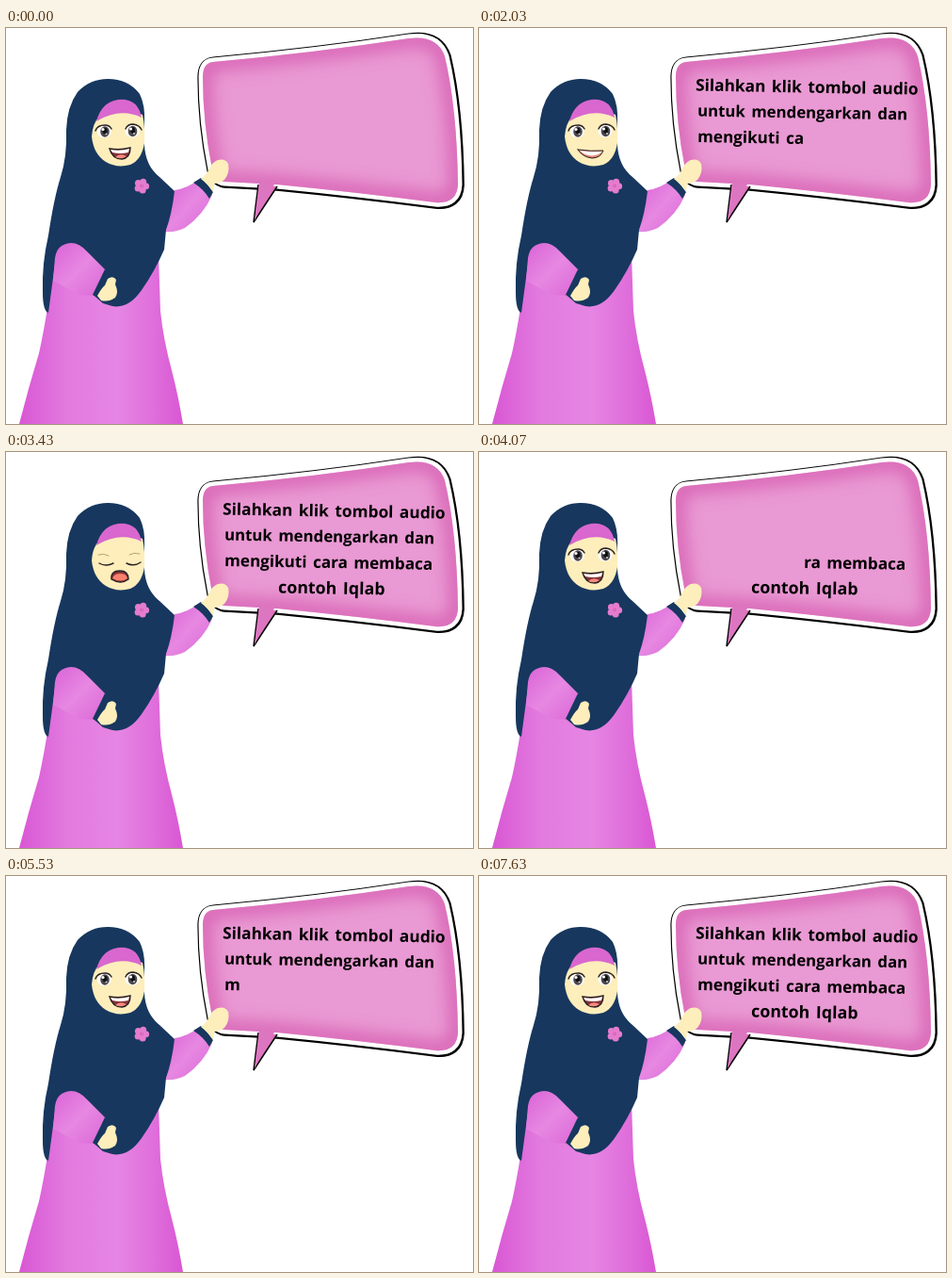
Write an HTML page that moves like this. It is 496 px wide and 420 px high and loops after 7.66 s.

```html
<!DOCTYPE html>
<html lang="id">
<head>
<meta charset="utf-8">
<style>
html, body { margin: 0; width: 100%; height: 100%; overflow: hidden; background: #fff; }
svg { display: block; width: 496px; height: 420px; }
text { font-family: "Open Sans", "Noto Sans", sans-serif; font-weight: bold; word-spacing: 2px; white-space: pre; }
.line { fill: none; stroke: #2a2024; stroke-width: 1.4; stroke-linecap: round; }
.skin { fill: #fdeebb; }
.navy { fill: #17375e; }
</style>
</head>
<body>
<svg viewBox="0 0 496 420">
  <defs>
    <linearGradient id="robe">
      <stop offset="0" stop-color="#d957d4"/><stop offset=".3" stop-color="#e27bdf"/>
      <stop offset=".6" stop-color="#e685e3"/><stop offset=".8" stop-color="#e071dc"/>
      <stop offset="1" stop-color="#d957d4"/>
    </linearGradient>
    <linearGradient id="sleeve" x2="1" y2="1">
      <stop offset="0" stop-color="#da62d6"/><stop offset=".5" stop-color="#e788e2"/>
      <stop offset="1" stop-color="#db67d7"/>
    </linearGradient>
    <filter id="soft" x="-20%" y="-20%" width="140%" height="140%"><feGaussianBlur stdDeviation="9"/></filter>
    <path id="panel" d="M220 36Q330 26 428 11Q458 7 466 30Q479 85 480 166Q479 187 456 185Q370 174 288 166L232 163Q223 162 219 150Q209 100 209 52Q209 37 220 36Z"/>
    <clipPath id="inside"><use href="#panel"/></clipPath>
  </defs>

  <!-- speech bubble -->
  <use href="#panel" x=".6" y=".6" fill="#000" stroke="#000" stroke-width="12.500" stroke-linejoin="round"/>
  <use href="#panel" fill="#fff" stroke="#fff" stroke-width="9" stroke-linejoin="round"/>
  <path d="M268 166L263 206L288 168" fill="#dd72bf" stroke="#000" stroke-width="1.500"/>
  <use href="#panel" fill="#e999d3"/>
  <g clip-path="url(#inside)">
    <use href="#panel" fill="none" stroke="#d862b4" stroke-width="18" filter="url(#soft)"/>
  </g>
  <path d="M269 163L264 204L286 164Z" fill="#dd76c1"/>
  <g id="words"></g>

  <!-- robe, veil and arms -->
  <path d="M52 236Q45 300 35 345Q24 381 14 420H188Q183 390 176 363Q167 330 164 300L162 240Z" fill="url(#robe)"/>
  <path d="M179 172Q193 170 204 161L219 177Q210 198 190 212Q180 217 169 216Z" fill="url(#sleeve)"/>
  <path class="navy" d="M199 164L207 159Q215 166 220 174L216 181Q210 171 199 164Z"/>
  <path class="skin" d="M207 160Q213 156 215 151Q219 142 225 140Q233 138 236 144Q238 154 232 161Q226 165 221 165L220 174Q214 165 207 160Z"/>
  <path class="navy" d="M108 54Q130 54 142 70Q148 82 147 100V124Q148 146 163 158L179 173Q176 198 170 214L168 235Q158 258 144 278Q130 298 113 295L103 292L60 255L52 250L45 302Q39 300 39 280Q38 250 45 220Q51 180 58 158Q65 136 64 108Q65 83 76 68Q89 54 108 54Z"/>
  <path d="M52 244Q54 229 69 228Q78 228 86 237L106 257L93 284L78 283L50 268Z" fill="url(#sleeve)"/>
  <path class="navy" d="M105 256L113 262L102 288L92 283Z"/>
  <path class="skin" d="M108 266Q114 262 117 267L116 272Q120 280 116 286Q109 291 101 289L97 284Q102 275 105 273Z"/>
  <g id="flower" fill="#e57ccd"></g>

  <!-- face -->
  <path class="skin" d="M91 115Q92 101 99 94Q120 82 145 92Q148 106 147 122Q144 140 132 145Q118 149 106 142Q93 134 91 115Z"/>
  <path d="M96 99Q101 79 119 76Q140 74 144 95Q121 84 96 99Z" fill="#d967cf"/>
  <g id="open">
    <g id="eye">
      <ellipse cx="104.500" cy="110" rx="7.500" ry="6.500" fill="#fff"/>
      <ellipse cx="105" cy="110" rx="4.800" ry="5.800" fill="#4a474e"/>
      <ellipse cx="105" cy="109" rx="2.500" ry="3.200" fill="#111"/>
      <circle cx="103" cy="107.500" r="1.600" fill="#fff"/>
      <circle cx="106.500" cy="112.500" r="1" fill="#ccc"/>
    </g>
    <use href="#eye" x="29.500" y="-.5"/>
    <path class="line" d="M95 109Q97 103 105 103Q110 103 112 107M127 107Q129 102 135 102Q142 103 144 108"/>
  </g>
  <g id="shut" class="line">
    <path d="M99 118Q106 122 114 118M128 118Q136 122 143 117"/>
    <path d="M98 109Q103 107 109 110M131 109Q136 106 142 108" style="stroke:#a98c65;stroke-width:.8"/>
  </g>
  <g class="line" id="mouths">
    <g>
      <path d="M110 128Q121 130 132 127Q132 138 123 139Q113 139 110 128Z" fill="#843238"/>
      <path d="M111 129Q121 131 131 128L130 132Q121 134 113 132Z" fill="#fff" stroke="none"/>
      <path d="M116 137Q121 132 128 136Q123 140 116 137Z" fill="#f58a7c" stroke="none"/>
    </g>
    <path d="M113 131Q115 135 122 133Q129 135 131 131"/>
    <g>
      <path d="M112 135Q111 126 121 126Q130 126 130 135Q122 141 112 135Z" fill="#8a3436"/>
      <path d="M113 134Q115 129 121 129Q128 129 129 134Q122 139 113 134Z" fill="#fa806e" stroke="none"/>
    </g>
    <g style="stroke-width:1">
      <path d="M105 129Q119 131 132 130Q129 138 120 138Q110 137 105 129Z" fill="#e58574"/>
      <path d="M107 130Q119 132 131 131Q127 135 120 135.500Q112 135 107 130Z" fill="#fff" stroke="none"/>
    </g>
  </g>
</svg>
<script>
const LOOP = 7660, STEP = 33.3;
const $ = id => document.getElementById(id);
const make = (tag, parent, attrs = {}) => {
  const el = document.createElementNS("http://www.w3.org/2000/svg", tag);
  for (const key in attrs) el.setAttribute(key, attrs[key]);
  return parent.appendChild(el);
};

for (let i = 0; i < 5; i++) {
  const a = i * Math.PI * 2 / 5 - 1.2;
  make("circle", $("flower"), { cx: 144 + 4.6 * Math.cos(a), cy: 167.5 + 4.6 * Math.sin(a), r: 3.5 });
}
make("circle", $("flower"), { cx: 144, cy: 167.5, r: 2, fill: "#d76cba" });

// Each line break counts as one typed character.
let count = 0;
const lines = [
  ["Silahkan klik tombol audio", 230, 66.5, 17.3],
  ["untuk mendengarkan dan", 232, 93.5, 16.8],
  ["mengikuti cara membaca", 232, 121, 17.1],
  ["contoh Iqlab", 289, 149.5, 17.8]
].map(([str, x, y, size]) => {
  const text = make("text", $("words"), { x, y, "font-size": size, transform: `rotate(1 ${x} ${y})` });
  const line = { str, start: count, gone: make("tspan", text, { fill: "none" }), shown: make("tspan", text) };
  count += str.length + 1;
  return line;
});

// Range of visible characters: type, wipe from the start, type again faster.
function visible(f) {
  if (f === 0) return [0, 0];
  if (f < 104) return [0, f + 1];
  if (f < 138) return [Math.floor((f - 103) * 3.3), count];
  return [0, Math.floor(20.4 + (f - 149) * 64 / 35)];
}

const talk = [0, 0, 1, 1, 2, 2, 3, 3, 3, 0, 0];
const mouths = [...$("mouths").children];
const show = (el, on) => el.style.display = on ? "" : "none";

function draw(now) {
  const f = Math.min(229, Math.floor((now % LOOP + 5) / STEP));
  const [from, to] = visible(f);
  for (const { str, start, gone, shown } of lines) {
    const a = Math.max(0, from - start), b = Math.max(0, to - start);
    gone.textContent = str.slice(0, a);
    shown.textContent = str.slice(a, b);
  }
  const blink = f > 30 && f % 34 < 4;
  show($("open"), !blink);
  show($("shut"), blink);
  mouths.forEach((m, i) => show(m, i === talk[f % talk.length]));
}

const begin = performance.now();
(function tick() {
  draw(performance.now() - begin);
  requestAnimationFrame(tick);
})();
</script>
</body>
</html>
```
